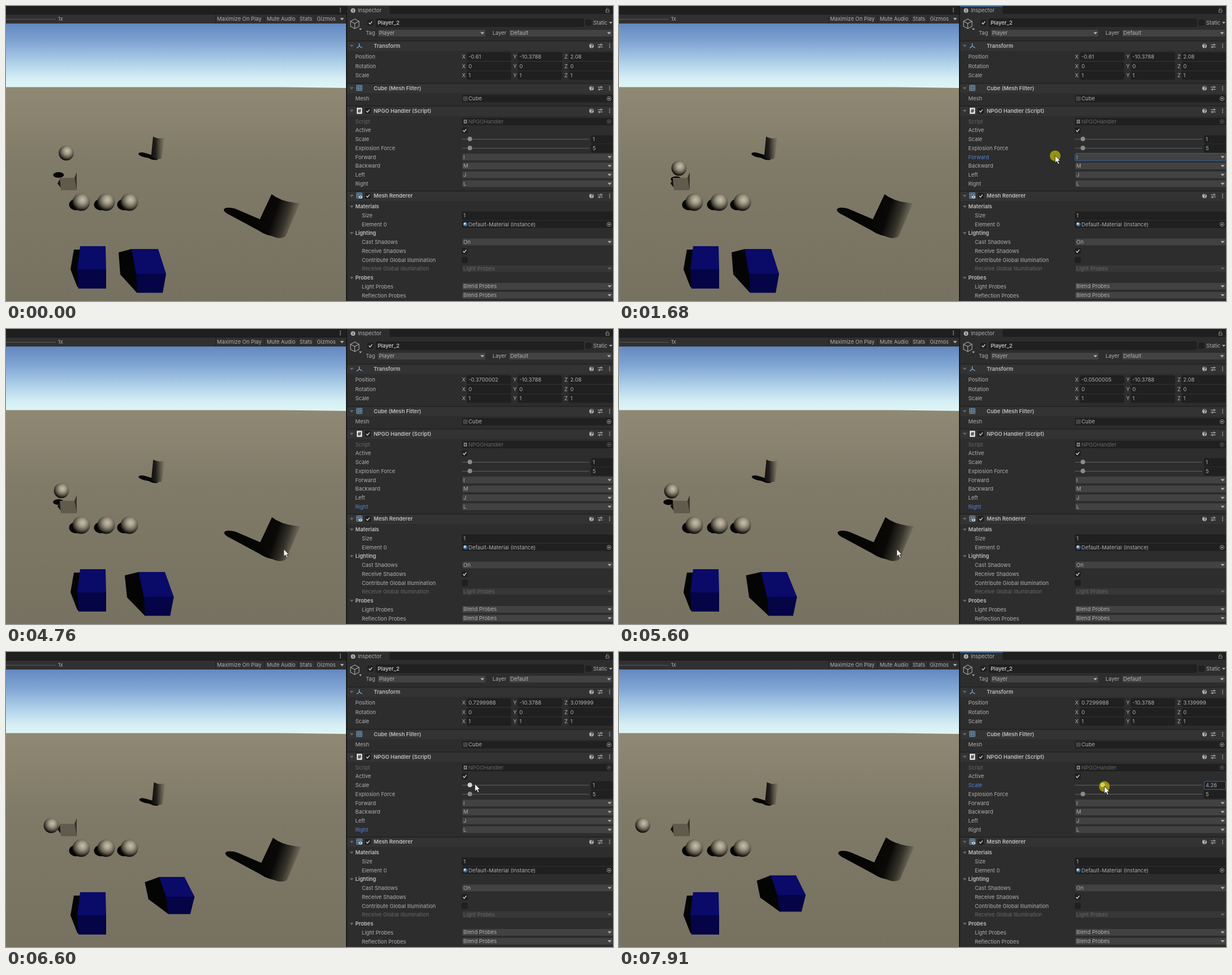
Animation of 1073 by 522 pixels, one loop 7990 ms. Source, as an HTML page:

```html
<!DOCTYPE html>
<html lang="en">
<head>
<meta charset="utf-8">
<title>Player inspector</title>
<style>
html, body { margin: 0; width: 100%; height: 100%; overflow: hidden; background: #2d2d2d; }
svg { display: block; }
text { font: 9.4px Inter, sans-serif; white-space: pre; }
.bold { font-weight: 600; }
</style>
</head>
<body>
<svg id="stage" width="1073" height="522" viewBox="0 0 1073 522">
  <defs>
    <linearGradient id="sky" x2="0" y2="1">
      <stop stop-color="#6288c0"/><stop offset=".3" stop-color="#82a7d4"/>
      <stop offset=".6" stop-color="#aed0e9"/><stop offset=".85" stop-color="#d6eff5"/>
      <stop offset="1" stop-color="#dff6f5"/>
    </linearGradient>
    <linearGradient id="ground" x2="0" y2="1">
      <stop stop-color="#8f8974"/><stop offset=".35" stop-color="#807a68"/><stop offset="1" stop-color="#767160"/>
    </linearGradient>
    <radialGradient id="ball" cx=".57" cy=".37" r=".62">
      <stop stop-color="#c6bfac"/><stop offset=".35" stop-color="#a09986"/>
      <stop offset=".7" stop-color="#5c574a"/><stop offset="1" stop-color="#0c0b09"/>
    </radialGradient>
    <linearGradient id="tube" y2=".35">
      <stop stop-color="#050504"/><stop offset=".48" stop-color="#0a0908"/>
      <stop offset=".75" stop-color="#36332b"/><stop offset=".95" stop-color="#6f6a5a"/>
    </linearGradient>
    <linearGradient id="post">
      <stop stop-color="#0f0e0c"/><stop offset=".35" stop-color="#22201b"/>
      <stop offset=".7" stop-color="#5c5749"/><stop offset="1" stop-color="#827c6a"/>
    </linearGradient>
  </defs>
  <g id="fixed"></g>
  <g id="moving"></g>
</svg>
<script>
const LOOP = 7990, STEP = 76.8;
const INK = '#b0b0b0', DIM = '#686868', BLUE = '#5683d4', FOCUS = '#376aa6';
const PANEL = '#2d2d2d', HEADER = '#333', INPUT = '#202020', DROP = '#424242', EDGE = '#191919';

const rect = (x, y, w, h, fill, extra = '') =>
  `<rect x="${x}" y="${y}" width="${w}" height="${h}" fill="${fill}" ${extra}/>`;
const poly = (points, fill, extra = '') => `<polygon points="${points.join(' ')}" fill="${fill}" ${extra}/>`;
const path = (d, fill, extra = '') => `<path d="${d}" fill="${fill}" ${extra}/>`;
const line = (d, color = INK, width = 1) => path(d, 'none', `stroke="${color}" stroke-width="${width}"`);
const oval = (x, y, rx, ry, fill, extra = '') =>
  `<ellipse cx="${x}" cy="${y}" rx="${rx}" ry="${ry}" fill="${fill}" ${extra}/>`;
const text = (x, y, s, fill = INK, cls = '') => `<text x="${x}" y="${y + 3.4}" fill="${fill}" class="${cls}">${s}</text>`;
const bold = (x, y, s) => text(x, y, s, '#c0c0c0', 'bold');

const arrow = (x, y, fill = INK, r = 3.5) => poly([x - r, y - r / 2, x + r, y - r / 2, x, y + r / 2 + .5], fill);
const dots = (x, y) => [-3, 0, 3].map(d => rect(x - .8, y + d - .8, 1.6, 1.6, INK)).join('');
const ring = (x, y, r, color = INK) => oval(x, y, r, r, 'none', `stroke="${color}" stroke-width=".8"`);
const field = (x, y, w, s = '') => rect(x, y - 7, w, 14, INPUT, 'rx="2" stroke="#1a1a1a" stroke-width=".6"') + text(x + 2.5, y, s);
const drop = (x, y, w, s, color = INK) =>
  rect(x, y - 6.5, w, 13, color === DIM ? '#373737' : DROP, 'rx="2" stroke="#242424" stroke-width=".6"') +
  text(x + 2.5, y, s, color) + arrow(x + w - 6, y, color);
const check = (x, y, on = true) => rect(x, y - 4.7, 9.4, 9.4, INPUT, 'rx="1.5" stroke="#191919" stroke-width=".7"') +
  (on ? line(`M${x + 2} ${y}l2 2.4 3.8-4.8`, '#d0d0d0', 1.4) : '');
const object = (y, s, icon, color = INK) =>
  rect(806, y - 6.5, 267, 13, INPUT, 'rx="2"') + icon + text(817.5, y, s, color) +
  ring(1066, y, 3.6, color) + oval(1066, y, 1.4, 1.4, color);
const grid = (x, y, r, color) =>
  line([-1, -.33, .33, 1].map(k => `M${x + k * r} ${y - r}v${2 * r}M${x - r} ${y + k * r}h${2 * r}`).join(''), color, .9);

function header(y, title, icon, checked) {
  return rect(603, y - 9, 470, 18, HEADER) + rect(603, y - 9, 470, 1, EDGE) +
    arrow(611, y, DIM) + icon + (checked ? check(635, y) : '') + bold(650, y, title) +
    oval(1035, y, 4, 4, INK) + text(1032.9, y, '?', HEADER, 'bold') +
    line(`M1046 ${y - 2}h9M1046 ${y + 2}h9M1052 ${y - 4.2}v4.4M1049 ${y - .2}v4.4`, INK, 1.1) + dots(1067, y);
}

function gameView() {
  const shade = x => oval(x - 9.5, 351.5, 12, 10, '#050504');
  const ball = x => shade(x) + oval(x, 347, 15.5, 15.5, 'url(#ball)');
  return rect(0, 0, 601, 14, '#1f1f1f') + rect(0, 14, 601, 17, '#303030') + rect(0, 14, 601, 1, EDGE) +
    line('M0 23.5H88', '#5a5a5a') + text(92, 23, '1x') + dots(591, 7) +
    [370, 456.5, 515.5, 545.5].map(x => rect(x, 15, 1, 16, '#222')).join('') +
    text(373, 23, 'Maximize On Play') + text(461, 23, 'Mute Audio') +
    text(519, 23, 'Stats') + text(549.5, 23, 'Gizmos') + arrow(594, 23) +
    rect(0, 31, 601, 115, 'url(#sky)') + path('M0 143.5H480L601 145V522H0Z', 'url(#ground)') +
    [133, 177, 218].map(ball).join('') +
    poly([120, 431, 132, 431, 130, 499, 126, 497, 114, 466], '#040404') +
    poly([131, 425, 176, 425, 177, 466, 126, 466], '#0a0a69') +
    poly([126, 466, 177, 466, 177, 500, 128, 500], '#040446');
}

function inspector() {
  const slider = y => rect(806, y - 1, 225, 1.3, '#575757');
  let s = rect(601, 0, 472, 522, PANEL) + rect(601, 0, 2, 522, EDGE) +
    rect(603, 0, 470, 14, '#1f1f1f') + rect(603, 0, 75, 15, PANEL) +
    oval(613.5, 8, 4, 4, INK) + rect(613, 5.5, 1.2, 1.2, PANEL) + rect(613, 7.4, 1.2, 3, PANEL) + text(622, 8, 'Inspector') +
    rect(1060.5, 7, 5.5, 4, 'none', 'stroke="#999" stroke-width=".9"') + line('M1061.500 7V5q2-3 3.800 0', '#999', .9) +
    line('M616.5 23l7.5 4v9l-7.5 4-7.5-4v-9zM609 27l7.5 4 7.5-4M616.5 31v9', '#aaa', 1.1) + arrow(626.5, 41, INK, 2.5) +
    check(639.5, 29.5) + field(654, 29.5, 367) + bold(657, 29.5, 'Player_2') +
    check(1025, 29.5, false) + text(1038, 29.5, 'Static') + arrow(1069, 29.5, INK, 3) +
    text(636, 48, 'Tag') + drop(657, 48, 191, 'Player') + text(860, 48, 'Layer') + drop(889, 48, 183, 'Default');

  s += header(70.5, 'Transform', line('M624.5 66v5l-4.5 3.5', '#7fb2d9', 1.3) + line('M624.5 71l5 3', '#7fb2d9', 1.3));
  [['Position', 89.5], ['Rotation', 106.5, 0], ['Scale', 123, 1]].forEach(([name, y, v = '']) => {
    s += text(617.5, y, name);
    [['X', 806, 815], ['Y', 896.5, 905], ['Z', 987, 995]].forEach(([axis, x, fx]) =>
      s += text(x, y, axis) + field(fx, y, 77.5, v));
  });
  s += text(907.5, 89.5, '-10.3788');

  s += header(145.5, 'Cube (Mesh Filter)', grid(624.5, 145, 4.7, '#7fb2d9')) +
    text(617.5, 164, 'Mesh') + object(164, 'Cube', grid(812, 164, 3.4, '#5c5c5c'));

  s += header(185.5, 'NPGO Handler (Script)', rect(620, 180, 9.5, 11, '#ddd', 'rx="1"') + text(621.7, 185.5, '#', '#222', 'bold'), true) +
    text(617.5, 204.5, 'Script', DIM) +
    object(204.5, 'NPGOHandler', rect(809, 201, 6, 7, '#777') + rect(811, 203.5, 2, 2, INPUT), DIM) +
    text(617.5, 220, 'Active') + check(806, 220) + slider(236) + field(1034.5, 236, 38) +
    text(617.5, 252, 'Explosion Force') + slider(252) + oval(820, 251.3, 4, 4, '#8b8b8b') + field(1034.5, 252, 38, '5');
  for (const [, y, key] of KEYS) s += drop(806, y, 267, key);

  s += header(336, 'Mesh Renderer', grid(624.5, 335.5, 4.7, '#7fb2d9') + oval(627, 338, 3, 2.2, '#ddd') + oval(627, 338, 1, 1, '#222'), true);
  for (const [y, name] of [[355, 'Materials'], [402, 'Lighting'], [481, 'Probes']])
    s += arrow(611, y, DIM) + bold(617.5, y, name);
  [[371, 'Size'], [386.3, 'Element 0'], [418, 'Cast Shadows'], [433.7, 'Receive Shadows'],
   [449.3, 'Contribute Global Illumination'], [465, 'Receive Global Illumination', DIM],
   [496.5, 'Light Probes'], [512.3, 'Reflection Probes']].forEach(([y, name, color]) => s += text(629, y, name, color));
  return s + field(806, 371, 267, '1') +
    object(386.3, 'Default-Material (Instance)', oval(812, 386.3, 3.8, 3.8, '#3f6f9c') + oval(811, 385.3, 2, 2, '#c9dcec')) +
    drop(806, 417.5, 267, 'On') + check(806, 433.7) + check(806, 449.3, false) +
    drop(806, 464.5, 267, 'Light Probes', DIM) + drop(806, 496, 267, 'Blend Probes') + drop(806, 511.7, 267, 'Blend Probes');
}

const KEYS = [['Forward', 267.3, 'I'], ['Backward', 283, 'M'], ['Left', 298.7, 'J'], ['Right', 314.4, 'L']];
const ROWS = [['Scale', 236], ...KEYS];

// Rows of [time, value...], blended between neighbours
function track(keys, t, ease = k => k) {
  const i = keys.findIndex(k => k[0] > t);
  if (i < 0) return keys.at(-1).slice(1);
  if (!i) return keys[0].slice(1);
  const a = keys[i - 1], b = keys[i], k = ease((t - a[0]) / (b[0] - a[0]));
  return a.slice(1).map((v, j) => v + (b[j + 1] - v) * k);
}
const smooth = k => k * k * (3 - 2 * k);

const POINTER = [[100, 1080, 300], [650, 780, 316], [1000, 778, 316], [1550, 771, 265], [1750, 771, 265],
  [1950, 772, 283], [2050, 772, 283], [2200, 773, 299], [2280, 773, 299], [2420, 773, 314], [2520, 770, 318],
  [3100, 491, 390], [5950, 491, 390], [6140, 614, 390], [6580, 829, 234], [6950, 823, 238], [7200, 823, 238], [7910, 858, 238]];
const PRESSES = [[680, 'Right'], [1600, 'Forward'], [1980, 'Backward'], [2220, 'Left'], [2440, 'Right'], [7080, 'Scale']];
const MOVE_X = [[4520, 0], [5070, .55], [5750, .55], [6140, .94], [6540, 1.34]];
const MOVE_Z = [[5680, 0], [6140, .46], [6600, .94], [6720, 1.06]];
const ROLL = [[1200, 106.5, 287], [1680, 106, 287], [3450, 101, 286], [4760, 98, 286], [6140, 90, 287],
  [6300, 87, 291], [6500, 82.5, 306], [6600, 80, 307], [7910, 42, 306.5]];

// Corner: x, y, x shift per unit sideways and forward, y shift linear and squared
const CORNERS = {
  backLeft: [222, 430, 51.5, -21.5, -44, 10.6], backRight: [269, 430, 49.5, -21.2, -44, 10.6],
  midRight: [283, 474, 56.5, -27, -60, 17.5], midLeft: [230, 474, 57, -25, -60, 17.5],
  lowRight: [277, 507.5, 55, -26.5, -57, 11], lowLeft: [231.5, 507.5, 59, -25, -57, 11],
  shadeBack: [199, 436, 45.5, -15.5, -38, 8], shadeFront: [202, 475, 50, -18.3, -55, 16]
};

function player(dx, dz) {
  const face = (names, fill) => poly(names.map(n => {
    const [x, y, kx, kz, ky, ky2] = CORNERS[n];
    return [x + kx * dx + kz * dz, y + ky * dz + ky2 * dz * dz];
  }), fill);
  return face(['shadeBack', 'backLeft', 'midRight', 'lowLeft', 'shadeFront'], '#040404') +
    face(['backLeft', 'backRight', 'midRight', 'midLeft'], '#0a0a69') +
    face(['midLeft', 'midRight', 'lowRight', 'lowLeft'], '#040446');
}

function cylinders(dx, dz) {
  const shift = (x, y, s) => `<g transform="translate(${x} ${y})">${s}</g>`;
  return shift(dx * 1.1, -dz * .6,
      path('M234 261Q237 257 249 261L268 267V272Q260 274 252 269Q234 266 234 261Z', '#060605') +
      path('M260 231Q268 236 280 233L275 270Q264 273 256.500 267Z', 'url(#post)')) +
    shift(dx * 2.6 - dz, -dz * 4.6,
      path('M385 360Q389 354 406 359L455 380 480 408Q462 408 446 397L396 370Q385 365 385 360Z', '#050504') +
      path('M469.500 333Q487 347 519.500 349L494 408Q488 412 478 410Q458 405 447 381Z', 'url(#tube)'));
}

function rollingBall(t) {
  let [x, y] = track(ROLL, t);
  const s = t / 1000;
  if (t < 1000) y = Math.min(287, 260 + 50 * s + 132 * s * s);
  const fallen = t > 6300;
  const shade = fallen ? '' : oval(x - 5 - (287 - y) * .32, 306.5 - (287 - y) * .28, 9.5, 5, '#050504');
  return shade + poly([91, 314, 96, 305, 98, 323], '#15130f') +
    poly([95, 304, 121, 304, 125, 326, 97, 326], '#605b4c') +
    poly([125, 294, 121, 304, 125, 326], '#36322a') +
    oval(x, y, 13.3, 13.3, 'url(#ball)');
}

function controls(t, dx, dz) {
  const press = PRESSES.findLast(p => p[0] <= t), selected = press && press[1];
  const focused = press && (t < 3100 || selected === 'Scale');
  const [px, py] = track(POINTER, t, smooth);
  const dragging = selected === 'Scale';
  const knob = dragging ? Math.max(820, px - 3) : 820;
  const scale = +(1 + (knob - 820) * 3.26 / 35).toFixed(2);
  const xText = dx ? (-.61 + dx - 8.8e-7 * dx).toFixed(7) : '-0.61';
  const zText = dz > .3 ? (2.08 + dz - 1e-6).toFixed(6) : +(2.08 + dz).toFixed(2);
  let s = text(817.5, 89.5, xText) + text(997.5, 89.5, zText) + text(1037, 236, scale);
  for (const [name, y] of ROWS) s += text(617.5, y, name, name === selected ? BLUE : INK);
  s += oval(knob, 235.3, 4, 4, t > 6520 ? '#d2d2d2' : '#8b8b8b');
  if (focused) {
    const y = ROWS.find(r => r[0] === selected)[1];
    s += rect(603, 0, 75, 1.2, FOCUS) + (dragging
      ? rect(1034.5, 229, 38, 14, 'none', `rx="2" stroke="${FOCUS}"`)
      : rect(806, y - 6.5, 266.5, 13, 'none', `rx="2" stroke="${FOCUS}"`));
  }
  const down = press && (dragging || t - press[0] < 130);
  if (down) s += oval(px, py, 9.5, 9.5, '#d6d000', 'opacity=".62"');
  if (t > 100) s += path(`M${px} ${py - .5}v13l3-2.700 2.200 5 2.200-1-2.200-4.800h4z`, '#fff', 'stroke="#111" stroke-width=".8"');
  return s;
}

const fixed = document.getElementById('fixed'), moving = document.getElementById('moving');
fixed.innerHTML = gameView() + inspector();

function draw(now) {
  const t = Math.floor((now % LOOP + 10) / STEP) * STEP;
  const snap = v => Math.round(v / .02) * .02;
  const dx = snap(track(MOVE_X, t)[0]), dz = snap(track(MOVE_Z, t)[0]);
  moving.innerHTML = cylinders(dx, dz) + rollingBall(t) + player(dx, dz) + controls(t, dx, dz);
  requestAnimationFrame(draw);
}
requestAnimationFrame(draw);
</script>
</body>
</html>
```
